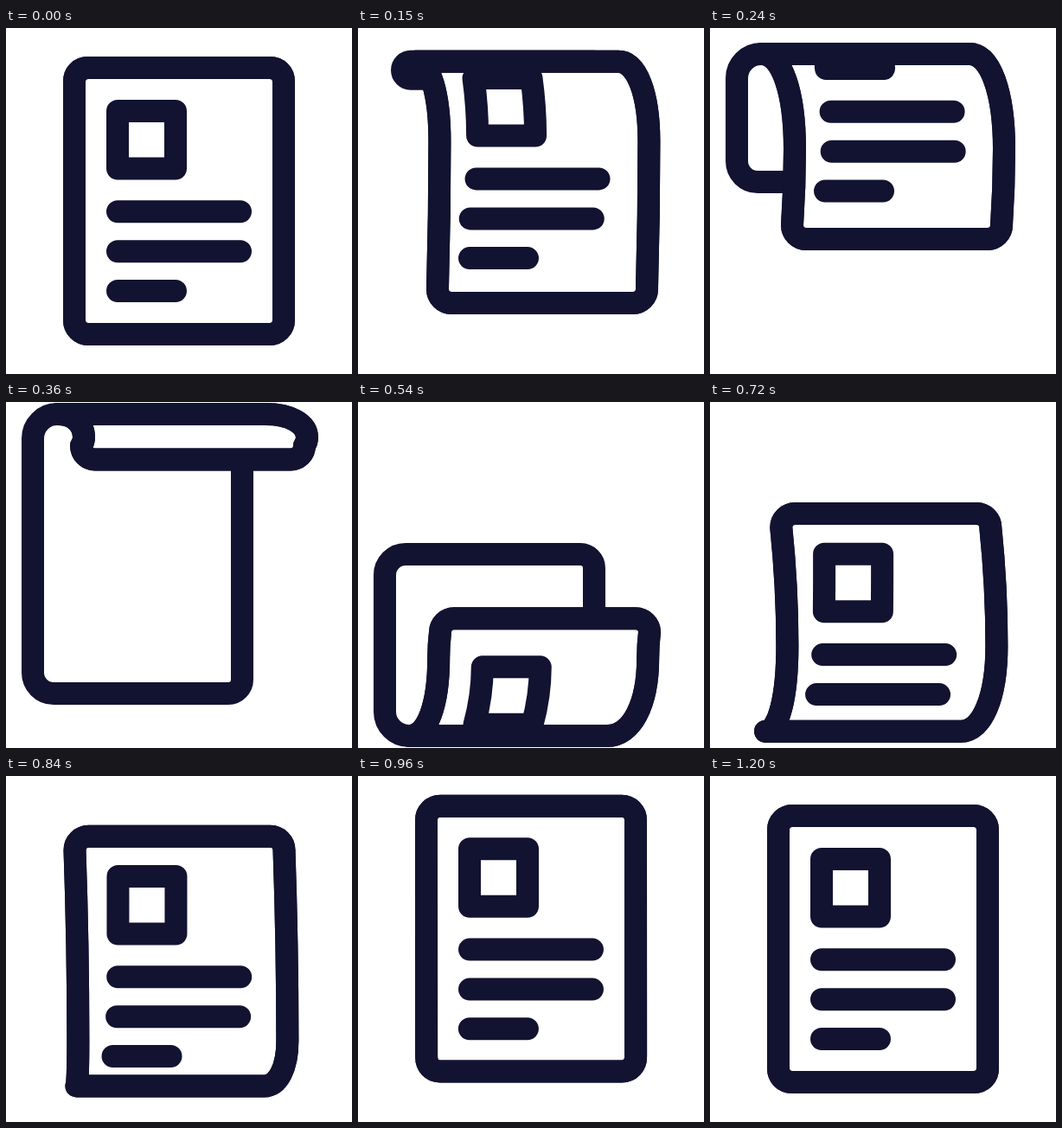
These frames come from a looping animation (400 px wide and 400 px high, 1230 ms). An HTML page:

```html
<!DOCTYPE html>
<html lang="en">
<head>
<meta charset="utf-8">
<title>Rolling document</title>
<style>
  html, body { margin: 0; width: 100%; height: 100%; overflow: hidden; background: #fff; }
  svg { display: block; width: 100vw; height: 100vh; }
  path { stroke: #121331; stroke-width: 26; stroke-linecap: round; stroke-linejoin: round; fill: #fff; }
  .line { fill: none; }
</style>
</head>
<body>
<svg viewBox="0 0 400 400">
  <clipPath id="clip"><path id="mask"/></clipPath>
  <path id="back"/>
  <path id="paper"/>
  <g clip-path="url(#clip)"><path id="content" class="line"/></g>
  <path id="edge" class="line"/>
</svg>
<script>
const LOOP = 1230, STEP = 30, FLIP = 390, LAND = 980, REST = 1200;
const LEFT = 79, RIGHT = 321, TOP = 46, BOTTOM = 354, R = 16;
const FLOOR = 386, OVERSHOOT = 13;

const el = id => document.getElementById(id);
const mix = (a, b, k) => a + (b - a) * k;
const clamp = v => Math.max(0, Math.min(1, v));
const smooth = v => (v = clamp(v)) * v * (3 - 2 * v);

// The sheet accelerates upward and folds back over a roll at the top.
function leave(t) {
  const k = t / 240;
  const travel = 110 * k ** 2.37;
  const bend = smooth(travel / 50);
  return {
    dir: 1,
    roll: TOP - 16 * k ** 1.7,
    front: BOTTOM - travel,
    back: Math.min(FLOOR, 178 + 1.325 * (t - 240)),
    shift: -1.05 * travel,
    bend, belly: 19 * bend, lean: 16 * bend,
    sway: 12 * bend, dip: 12 * bend, reach: 42, inset: 300
  };
}

// It comes back under a roll at the bottom, overshoots and settles.
function enter(t) {
  const rem = Math.max(0, LAND - t) / 602;
  const settle = OVERSHOOT * (smooth((t - LAND) / (REST - LAND)) - 1);
  const flat = smooth((t - 650) / 330), bend = 1 - flat;
  const lean = Math.min(16, 41 * rem ** 3);
  return {
    dir: -1,
    roll: mix(FLOOR, BOTTOM + settle, flat),
    front: TOP + settle + 353 * rem ** 1.55,
    back: 14 + 162 * ((t - FLIP) / 150) ** 1.15,
    shift: settle + 377 * rem ** 1.67,
    bend, belly: 11 * bend + .2 * lean, lean,
    sway: lean, dip: bend * (48 - 2 * lean), reach: 400, inset: 288
  };
}

// Rounded corner from a to b around c.
const corner = (ax, ay, cx, cy, bx, by) =>
  `C${mix(ax, cx, .55)} ${mix(ay, cy, .55)} ${mix(bx, cx, .55)} ${mix(by, cy, .55)} ${bx} ${by}`;

function frontPath({ dir, roll: y, front: e, bend, belly, lean, inset }) {
  const ext = Math.abs(e - y);
  const r = Math.min(R, ext / 2);
  const h = mix(r, Math.min(110, (ext - r) * .75), bend);
  const grow = Math.min(1, ext / 50);
  const flare = 8 * bend * clamp((120 - ext) / 67);
  const xl = mix(LEFT + R, 60, bend), xr = mix(RIGHT - R, inset, bend);
  const ml = LEFT + grow * (belly - flare), mr = RIGHT + grow * (belly + flare);
  const fl = LEFT + grow * (lean - flare), fr = RIGHT + grow * (lean + flare);
  const yh = y + dir * h, yc = y + dir * h * .4, ye = e - dir * r, ym = (yh + ye) / 2;
  return `M${xl} ${y}C${mix(xl, ml, .6)} ${y} ${ml} ${yc} ${ml} ${yh}`
    + `Q${ml} ${ym} ${fl} ${ye}` + corner(fl, ye, fl, e, fl + R, e)
    + `H${fr - R}` + corner(fr - R, e, fr, e, fr, ye)
    + `Q${mr} ${ym} ${mr} ${yh}`
    + `C${mr} ${yc} ${mix(xr, mr, .6)} ${y} ${xr} ${y}Z`;
}

function backPath({ dir, roll: y, back: e }) {
  const ext = Math.abs(e - y), right = 273;
  const left = 61 - 30 * Math.min(1, ext / 60);
  const [a, b, c] = [28, 24, R].map(r => Math.min(r, ext / 2));
  return `M${left + a} ${y}` + corner(left + a, y, left, y, left, y + dir * a)
    + `V${e - dir * b}` + corner(left, e - dir * b, left, e, left + b, e)
    + `H${right - c}` + corner(right - c, e, right, e, right, e - dir * c) + `V${y}Z`;
}

function contentPath({ roll, shift, sway, dip, reach }) {
  const x = y => {
    const q = Math.abs(y - roll), far = Math.max(0, q - 115) / reach;
    return 129 + sway * Math.exp(-far * far) - dip * Math.exp(-q / 31);
  };
  const row = (y, w) => `M${x(y + shift)} ${y + shift}h${w}`;
  const y0 = 96 + shift, y1 = y0 + 66.5, ym = (y0 + y1) / 2;
  const a = x(y0), b = x(y1), m = 2 * x(ym) - (a + b) / 2;
  return `M${a} ${y0}h67Q${m + 67} ${ym} ${b + 67} ${y1}h-67Q${m} ${ym} ${a} ${y0}Z`
    + row(212.3, 142) + row(258.3, 142) + row(304, 67);
}

function draw(t) {
  const p = t < FLIP ? leave(t) : enter(t);
  const hasFront = p.dir * (p.front - p.roll) > 6;
  const hasBack = p.dir * (p.back - p.roll) > 4;
  const sheet = hasFront ? frontPath(p) : "";
  for (const id of ["mask", "paper", "edge"]) el(id).setAttribute("d", sheet);
  el("back").setAttribute("d", hasBack ? backPath(p) : "");
  el("content").setAttribute("d", hasFront ? contentPath(p) : "");
}

const start = performance.now();
function tick() {
  const t = (performance.now() - start) % LOOP;
  draw(Math.floor(t / STEP) * STEP);
  requestAnimationFrame(tick);
}
tick();
</script>
</body>
</html>
```
